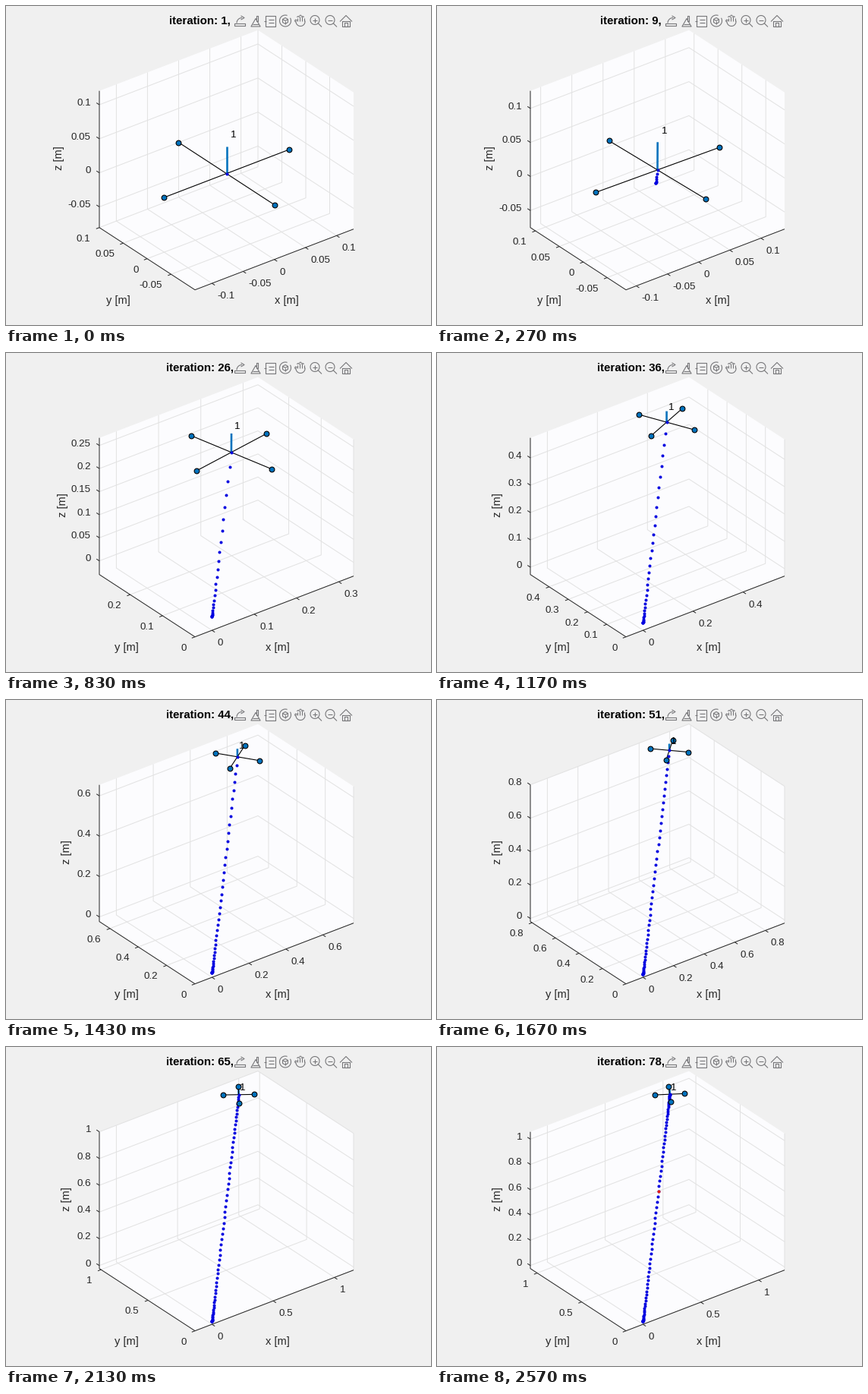
A matplotlib script for the animation above (2.61 s loop, 560x420 px).

```python
import numpy as np
import matplotlib.pyplot as plt
from matplotlib.animation import FuncAnimation
from matplotlib.collections import LineCollection

W, H, DPI = 560, 420, 100
PX = 72 / DPI
STEPS = 78
BACK, WALL, GRID = "#f0f0f0", "#fcfcfe", "#e2e2e2"
INK, ICON, BLUE = "#262626", "#77777a", "#0072bd"

# The axes box on screen: front corner and its three edge vectors
FRONT = np.array([249, 373.7])
EX, EY, EZ = EDGES = np.array([[209, -80], [-126, -82], [0, -180]])
TURN, RISE = np.radians([37.5, 30])
FORESHORTEN = np.array([np.cos(TURN), np.sin(TURN), np.cos(RISE)])
LENGTHS = np.abs([EX[0], EY[0], EZ[1]]) / FORESHORTEN
MAX_TICKS = (5.7, 5.0, 6.5)
ARM, MAST = 0.1, 0.04

# Flight progress: a quintic ramp whose clock slows down slightly
k = np.arange(STEPS)
u = k / 40 - 1
s = k * (0.0128 - 0.00036 * u - 0.00083 * u**3)
PATH = 10 * s**3 - 15 * s**4 + 6 * s**5 + 1e-7
TILT = 0.0055 * (60 * s - 180 * s**2 + 120 * s**3)

fig = plt.figure(figsize=(W / DPI, H / DPI), dpi=DPI, facecolor=BACK)
ax = fig.add_axes([0, 0, 1, 1])
ax.set(xlim=(0, W), ylim=(H, 0))
ax.axis("off")


def strokes(color, width, z, lines=()):
    item = LineCollection(list(lines), colors=color, linewidths=width * PX, zorder=z)
    ax.add_collection(item)
    return item


def label(x, y, text="", size=13.33, **kw):
    return ax.text(x, y, text, fontsize=size * PX, family="Liberation Sans",
                   **{"color": INK, "zorder": 8, **kw})


def dots(size, **kw):
    return ax.plot([], [], "o", ms=size * PX, **kw)[0]


def arc(x, y, r, a=0, b=360, n=30):
    t = np.radians(np.linspace(a, b, n + 1))
    return np.column_stack([x + r * np.cos(t), y + r * np.sin(t)])


def box(x, y, w, h):
    return [(x, y), (x + w, y), (x + w, y + h), (x, y + h), (x, y)]


def rule(x, y, w):
    return [(x, y), (x + w, y)]


def toolbar():
    lines = []

    def put(x, *shapes):
        lines.extend(np.add(shape, (x, 19.5)) for shape in shapes)

    put(308, box(-7, 3, 14, 3), arc(3, 3, 7, 180, 270), arc(3, -4, 3, -120, 120, 2))
    put(329, box(1, -7, 2, 7), arc(0, 4, 7, -90, 270, 3), rule(-4, 4, 8))
    put(348, box(-6, -7, 13, 14), rule(-2, -2, 7), rule(-2, 2, 7), rule(-8, 0, 3))
    put(368, arc(0, 0, 7.5, -30, 290), arc(0, 0, 4, -90, 270, 6),
        *([(0, 0), tip] for tip in arc(0, 0, 4, 90, 330, 2)))
    put(388, arc(0, 1, 6, -10, 190), arc(-6, 0, 1.3, 90, 360),
        *(arc(x, abs(x) / 2 - 6, 1.3, 180, 360) for x in (-3, 0, 3)),
        *([(x, 0), (x, abs(x) / 2 - 6)] for x in (-4.5, -1.5, 1.5, 4.5)))
    for x in (408, 428):
        put(x, arc(-1, -1, 6), [(3, 3), (8, 8)], rule(-4, -1, 6))
    put(408, [(-1, -4), (-1, 2)])
    put(448, [(-8, 1), (0, -7), (8, 1)], box(-5, 0, 10, 7), box(-2, 2, 4, 5))
    return lines


hexagon = [FRONT, FRONT + EX, FRONT + EX + EZ, FRONT + EX + EY + EZ,
           FRONT + EY + EZ, FRONT + EY]
ax.fill(*np.transpose(hexagon), color=WALL, lw=0, zorder=1)
strokes(INK, 1, 3, [[FRONT + EX, FRONT, FRONT + EY, FRONT + EY + EZ]])
strokes(ICON, 1.1, 9, toolbar())

grid = strokes(GRID, 1, 2)
marks = strokes(INK, 1, 3)
arms = strokes("black", 1.1, 5)
mast = strokes(BLUE, 2.6, 4)
trail = dots(4, color="#0000e0", mew=0, zorder=6)
alert = dots(4, color="#e81c10", mew=0, zorder=7)
rotors = dots(6.8, mfc=BLUE, mec="black", mew=1.1 * PX, zorder=7)
title = label(0, 24, size=15, weight="bold", color="black")
tag = label(0, 0, "1", color="black")
names = [label(0, 392, "x [m]", 14.67, ha="center"),
         label(0, 392, "y [m]", 14.67, ha="center"),
         label(0, 200, "z [m]", 14.67, ha="center", va="center", rotation=90)]
numbers = [[label(0, 0, ha=side) for _ in range(9)] for side in ("left", "right", "right")]

# Per axis: base of its edge, outward tick direction, offset of its numbers
AXES = [(FRONT, -EY, (7, 20)), (FRONT, -EX, (-11.5, 18)), (FRONT + EY, EY, (-11, 0.8))]


def limits(p, yaw):
    reach = ARM * max(abs(np.cos(yaw)), abs(np.sin(yaw)))
    lo, hi = min(0, p - reach), p + reach
    scale = LENGTHS[1] / (hi - lo)
    span = LENGTHS / scale
    low = np.array([(lo + hi) / 2 - span[0] / 2, lo, (p + MAST) / 2 - span[2] / 2])
    return low, span, scale


def ticks(lo, span, most):
    step = next(v for v in (0.05, 0.1, 0.2, 0.5, 1) if span / v <= most)
    first = int(np.ceil(lo / step))
    last = int(np.floor((lo + span) / step + 0.01))
    return [i * step for i in range(first, last + 1)]


def draw_axes(low, span):
    lines, dashes = [], []
    for i, (base, out, shift) in enumerate(AXES):
        values = ticks(low[i], span[i], MAX_TICKS[i])
        out = out / np.hypot(*out)
        # The two walls or floor that each grid line crosses
        first, second = [(EY, EZ), (EX, EZ), (EX, -EY)][i]
        widest = 0
        for item in numbers[i]:
            item.set_text("")
        for item, value in zip(numbers[i], values):
            spot = base + EDGES[i] * (value - low[i]) / span[i]
            text = f"{round(value, 2):g}"
            widest = max(widest, len(text))
            item.set_text(text)
            item.set_position(spot + shift)
            dashes.append([spot, spot + 4.5 * out])
            lines.append([spot, spot + first, spot + first + second])
        names[i].set_x((340 + 6 * widest, 175.5 - 5.5 * widest, 95 - 5 * widest)[i])
    grid.set_segments(lines)
    marks.set_segments(dashes)


def update(frame):
    # Steps last a thirtieth of a second on a 10 ms clock
    now = min(int(0.3 * frame + 0.15), STEPS - 1)
    p, lean = PATH[now], TILT[now]
    low, span, scale = limits(p, p)

    def project(points):
        return FRONT + (np.asarray(points) - low) / span @ EDGES

    draw_axes(low, span)
    centre = np.full(3, p)
    c, sn = np.cos(p), np.sin(p)
    ahead = ARM * np.array([c, sn, -lean * (c + sn)])
    aside = ARM * np.array([-sn, c, -lean * (c - sn)])
    ends = project([centre + ahead, centre - ahead, centre + aside, centre - aside])
    arms.set_segments([ends[:2], ends[2:]])
    rotors.set_data(*ends.T)
    mast.set_segments([project([centre, centre + MAST * np.array([lean, lean, 1])])])

    track = project(np.repeat(PATH[:now + 1, None], 3, axis=1))
    trail.set_data(*track.T)
    alert.set_data(*(track[42:43].T if now == STEPS - 1 else ([], [])))
    tag.set_position(track[-1] + (0.0055 * scale, 4.8 - 0.0505 * scale))
    title.set_text(f"iteration: {now + 1},")
    title.set_x(215 if now < 9 else 211)
    return []


anim = FuncAnimation(fig, update, frames=261, interval=10, repeat=True,
                     repeat_delay=0, blit=False)
plt.show()
```
